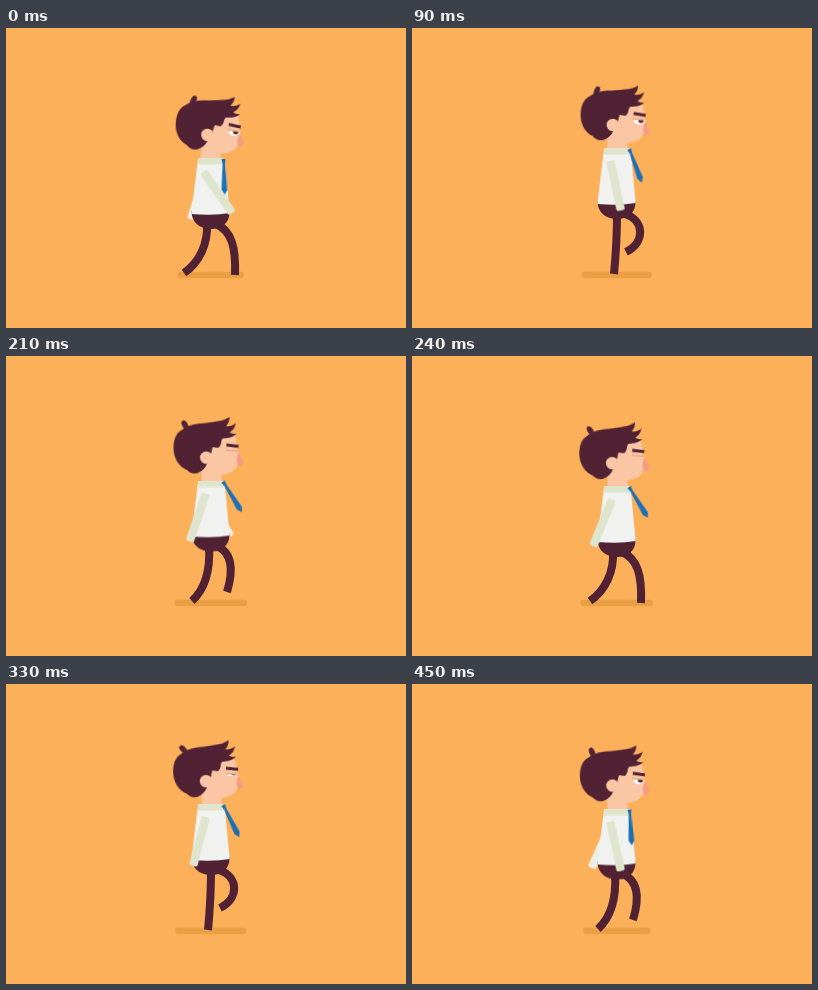
These frames come from a looping animation (400 px wide and 300 px high, 0.48 s). An HTML page without scripts:

```html
<!DOCTYPE html>
<html lang="en">
<head>
<meta charset="utf-8">
<title>Walk cycle</title>
<style>
  html, body { margin: 0; width: 100%; height: 100%; overflow: hidden; background: #fcb05a; }
  svg { display: block; width: 100%; height: 100%; }

  .dark { fill: #512234; }
  .skin { fill: #fac6a4; }
  .sleeve { fill: #dfe4cd; }
  .shirt { fill: #f1f1f0; }

  /* Everything moves on a 30 ms beat: keyframes are poses, steps() fills the beats between. */
  .move { animation: 480ms steps(2) infinite; }
  .bob { animation: bob 240ms steps(2) infinite; }
  .shadow { animation-name: shadow; transform-origin: 205px 247px; }
  .near-arm { animation-name: near-arm; transform-origin: 199px 146px; }
  .far-arm { animation-name: far-arm; transform-origin: 199px 146px; }
  .tie { animation-name: tie; transform-origin: 217.5px 132px; }
  .head { animation-name: head; transform-origin: 203px 118px; }
  .tuft { animation-name: tuft; transform-origin: 184px 77px; }
  .eye { animation-name: blink; transform-origin: 228px 102px; }

  .leg {
    fill: none; stroke: #512234; stroke-width: 8;
    --land: path("M210 196C226 203 230 220 229 247");
    --plant: path("M212 190C215 208 214 226 214 245");
    --stand: path("M205 186C205 205 204 225 202 246");
    --lean: path("M205 186C207 208 204 226 199 246");
    --lean-back: path("M206 186C206 205 201 226 197 244");
    --push: path("M203 190C204.500 214 200 232 186 245");
    --trail: path("M201 196C202 215 194 234 178 245");
    --lift: path("M208 190C215 206 214 228 191 234");
    --fold: path("M213 186C232 192 234 214 214 224");
    --swing: path("M213 186C233 193 234 214 217 225");
    --swing-low: path("M212 186C224 192 226 214 213 225");
    --reach: path("M211 190C227 197 227 216 221 236");
  }
  .leg-a { animation-name: leg-a; }
  .leg-b { animation-name: leg-b; }

  @keyframes leg-a {
    0% { d: var(--land); animation-timing-function: step-end; }
    6.25% { d: var(--plant); }
    18.75% { d: var(--stand); }
    31.25% { d: var(--lean); }
    43.75% { d: var(--push); animation-timing-function: step-end; }
    50% { d: var(--trail); animation-timing-function: step-end; }
    56.25% { d: var(--lift); }
    68.75% { d: var(--fold); }
    81.25% { d: var(--swing-low); }
    93.75% { d: var(--reach); animation-timing-function: step-end; }
    100% { d: var(--land); }
  }
  @keyframes leg-b {
    0% { d: var(--trail); animation-timing-function: step-end; }
    6.25% { d: var(--lift); }
    18.75% { d: var(--fold); }
    31.25% { d: var(--swing); }
    43.75% { d: var(--reach); animation-timing-function: step-end; }
    50% { d: var(--land); animation-timing-function: step-end; }
    56.25% { d: var(--plant); }
    68.75% { d: var(--stand); }
    81.25% { d: var(--lean-back); }
    93.75% { d: var(--push); animation-timing-function: step-end; }
    100% { d: var(--trail); }
  }
  @keyframes bob {
    0% { transform: none; animation-timing-function: step-end; }
    12.5% { transform: translateY(-5.5px); }
    37.5% { transform: translateY(-10px); }
    62.5% { transform: translateY(-11px); }
    87.5% { transform: translateY(-5.5px); animation-timing-function: step-end; }
    100% { transform: none; }
  }
  @keyframes near-arm {
    0% { transform: rotate(-35deg); animation-timing-function: steps(3); }
    18.75% { transform: rotate(-12deg); }
    31.25% { transform: rotate(5deg); }
    43.75% { transform: rotate(19deg); }
    56.25% { transform: rotate(25deg); animation-timing-function: steps(4); }
    81.25% { transform: rotate(4deg); }
    93.75% { transform: rotate(-12deg); animation-timing-function: step-end; }
    100% { transform: rotate(-35deg); }
  }
  @keyframes far-arm {
    0% { transform: rotate(17deg); animation-timing-function: steps(3); }
    18.75% { transform: rotate(5deg); }
    31.25% { transform: rotate(-18deg); }
    43.75% { transform: rotate(-33deg); }
    56.25% { transform: rotate(-20deg); animation-timing-function: steps(4); }
    81.25% { transform: rotate(5deg); }
    93.75% { transform: rotate(24deg); animation-timing-function: step-end; }
    100% { transform: rotate(17deg); }
  }
  @keyframes tie {
    0% { transform: rotate(-1deg); animation-timing-function: steps(3); }
    18.75% { transform: rotate(-20deg); }
    31.25% { transform: rotate(-28deg); }
    43.75%, 56.25% { transform: rotate(-31deg); }
    56.25% { animation-timing-function: steps(4); }
    81.25% { transform: rotate(-21deg); }
    93.75% { transform: rotate(-3deg); animation-timing-function: step-end; }
    100% { transform: rotate(-1deg); }
  }
  @keyframes head {
    0% { transform: rotate(2deg); animation-timing-function: steps(3); }
    18.75% { transform: rotate(-1deg); }
    31.25% { transform: rotate(-4deg); }
    43.75% { transform: rotate(-4deg); }
    56.25% { transform: rotate(-5deg); animation-timing-function: steps(4); }
    81.25% { transform: rotate(-5deg); }
    93.75% { transform: rotate(-3deg); animation-timing-function: step-end; }
    100% { transform: rotate(2deg); }
  }
  @keyframes tuft {
    0% { transform: rotate(25deg); animation-timing-function: steps(3); }
    18.75% { transform: rotate(22deg); }
    31.25% { transform: rotate(0deg); }
    43.75% { transform: rotate(-25deg); }
    56.25% { transform: rotate(-32deg); animation-timing-function: steps(4); }
    81.25% { transform: rotate(-45deg); }
    93.75% { transform: rotate(-20deg); animation-timing-function: step-end; }
    100% { transform: rotate(25deg); }
  }
  @keyframes blink {
    0% { transform: scaleY(1); animation-timing-function: steps(3); }
    18.75% { transform: scaleY(1); }
    31.25% { transform: scaleY(.7); }
    43.75%, 56.25% { transform: scaleY(0); }
    56.25% { animation-timing-function: steps(4); }
    81.25% { transform: scaleY(.85); }
    93.75%, 100% { transform: scaleY(1); }
    93.75% { animation-timing-function: step-end; }
  }
  @keyframes shadow {
    0% { transform: scaleX(.91); animation-timing-function: steps(3); }
    18.75% { transform: scaleX(.97); }
    31.25% { transform: scaleX(.99); }
    43.75%, 56.25% { transform: scaleX(1); }
    56.25% { animation-timing-function: steps(4); }
    81.25% { transform: scaleX(.97); }
    93.75% { transform: scaleX(.93); animation-timing-function: step-end; }
    100% { transform: scaleX(.91); }
  }
</style>
</head>
<body>
<svg viewBox="0 0 400 300">
  <defs>
    <rect id="arm" x="194.750" y="143" width="8.500" height="50.500" rx="2"/>
  </defs>

  <rect class="move shadow" x="168.500" y="243.700" width="72.500" height="6.600" rx="3" fill="#eb9f45"/>

  <g class="bob">
    <g class="move far-arm"><use href="#arm" fill="#eceee2"/></g>
  </g>

  <path class="move leg leg-b" d="M201 196C202 215 194 234 178 245"/>
  <path class="move leg leg-a" d="M210 196C226 203 230 220 229 247"/>

  <g class="bob">
    <path class="dark" d="M185.500 183H223.500C224 196 214 201 205 201S185.500 196 185.500 183Z"/>
    <path class="shirt" d="M192 131H218.500L223.700 185Q208 188 185.300 186Z"/>

    <g class="move head">
      <path class="skin" d="M195 112H215V133H195Z"/>
      <path class="skin" d="M199 84H231L234 107C234 119 226 125 215 125H198Z"/>
      <path fill="#f79a86" d="M233.500 104L237.500 113Q238 118 232 117.500Q230 111 233.500 104Z"/>
      <g class="move eye">
        <path fill="#fff" d="M222 102H233.500A5.750 5 0 0 1 222 102Z"/>
        <path class="dark" d="M226.500 102H232A2.750 3.500 0 0 1 226.500 102Z"/>
      </g>
      <path d="M221 101L233.500 102.500" stroke="#e3ad85" stroke-width="1.400"/>
      <path d="M222 95.700L234 98" stroke="#512234" stroke-width="3"/>
      <path class="dark" d="M192 121.500C187 123 183 121 181 118C173 114 168.500 105 169 96C169.500 87 172 81 178 78C188 71 198 73 209 72C217 71.500 222 71 227 68C227 72 225 75 223 77C227 77.500 230 77 233 74.500C232 79 229 82 226 83.500C229 85 231 85.500 233 85C230 88.500 225 89 219 89C216 91 218 95 214 98L208 97L206 104L202 112Q198 120 192 121.500Z"/>
      <g class="move tuft"><ellipse class="dark" cx="184" cy="72.500" rx="2.800" ry="5"/></g>
      <circle class="skin" cx="201" cy="107" r="6.200"/>
    </g>

    <rect class="sleeve" x="192" y="130" width="25.500" height="6.500" rx="1"/>
    <path class="move tie" fill="#1c6fb5" d="M215.500 131H219.500L219 136L220.800 162L218 167L215 162L216.500 136Z"/>
    <g class="move near-arm"><use href="#arm" class="sleeve"/></g>
  </g>
</svg>
</body>
</html>
```
